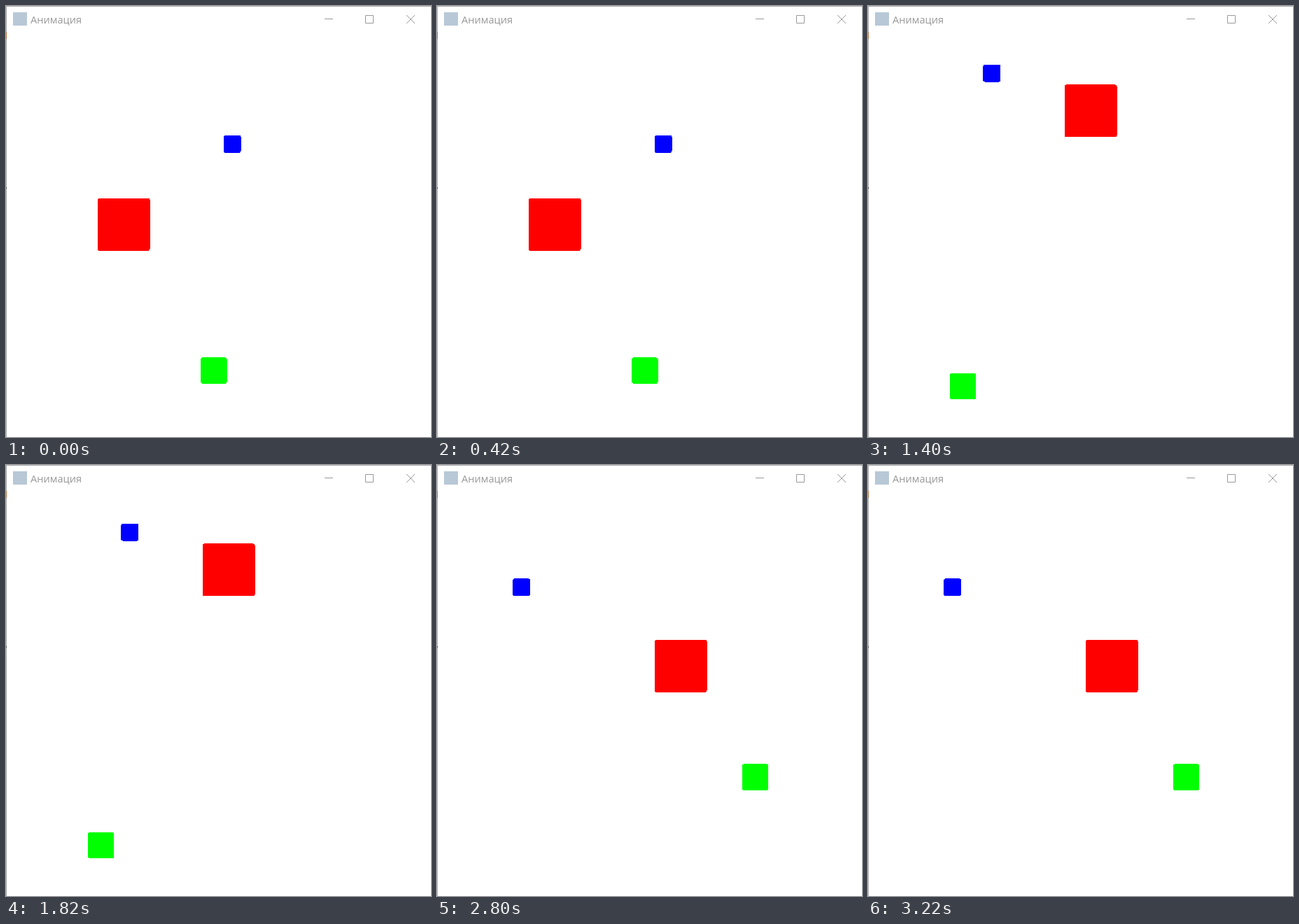
Animation, 607 px wide and 616 px high, one loop 3500 ms. Source, as an HTML page:

```html
<!DOCTYPE html>
<html lang="ru">
<head>
<meta charset="utf-8">
<style>
  html, body { margin: 0; width: 100%; height: 100%; overflow: hidden; background: #fff; }
  svg { display: block; }
  text { font: 14.6px "Open Sans", "Noto Sans", sans-serif; fill: #999; }
  .crisp { shape-rendering: crispEdges; }
</style>
</head>
<body>
<svg width="607" height="616" viewBox="0 0 607 616">
  <g class="crisp">
    <path d="M0 0H607V1H1V616H0Z" fill="#aaa"/>
    <path d="M0 37h1v10h-1z" fill="#b0703c"/>
    <path d="M0 259h1v2h-1z" fill="#444"/>
    <rect x="10" y="9" width="20" height="19" fill="#b8c8d6"/>
  </g>
  <text x="35" y="25">Анимация</text>
  <g fill="none" stroke="#999">
    <path d="M455 18.5h12M513.5 13.5h11v11h-11z"/>
    <path d="M572 13l12 12m0-12l-12 12"/>
  </g>
  <g id="room" class="crisp" transform="translate(.6 37.4) scale(1.25)"></g>
</svg>
<script>
const HOLD = 700;
const room = document.getElementById('room');

// A box jumps in whole strides [dx, dy] from its home; each hop is a stride count.
function makeBox(fill, size, home, stride, hops) {
  const node = document.createElementNS(room.namespaceURI, 'rect');
  const look = { fill, width: size, height: size, rx: 2.5 };
  for (const name in look) node.setAttribute(name, look[name]);
  room.append(node);
  return step => ['x', 'y'].forEach((axis, i) =>
    node.setAttribute(axis, home[i] + stride[i] * hops[step][i]));
}

const boxes = [
  makeBox('#f00', 60, [104, 190], [8, 10], [[0, 0], [19, 17], [15, -13], [-3, 11], [18, -2]]),
  makeBox('#0f0', 30, [222, 372], [3, 3], [[0, 0], [61, -54], [-43, 6], [-63, 14], [42, -20]]),
  makeBox('#00f', 20, [248, 118], [3, 9], [[0, 0], [1, -1], [-39, -9], [-3, 11], [-54, -2]]),
];

function draw() {
  const step = Math.floor(performance.now() / HOLD) % 5;
  for (const moveTo of boxes) moveTo(step);
  requestAnimationFrame(draw);
}
draw();
</script>
</body>
</html>
```
